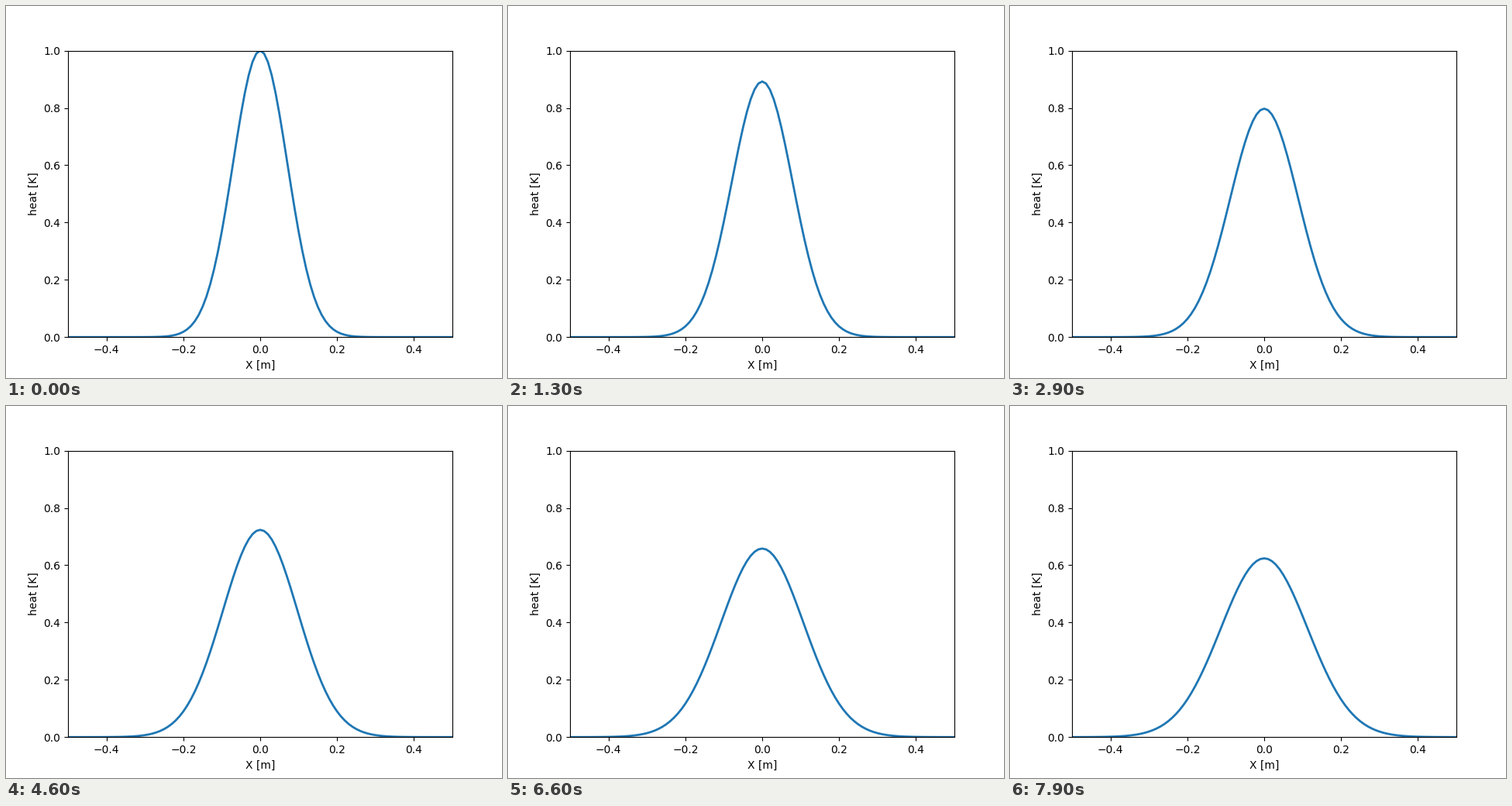
Recreate the animation shown at these times as a matplotlib script. Size 640 by 480 pixels, loop 8000 ms.

```python
import matplotlib.pyplot as plt
import numpy as np
from matplotlib.animation import FuncAnimation

FRAMES = 80
INTERVAL = 100
N = 101
R = 0.5  # diffusivity * dt / dx**2

x = np.linspace(-0.5, 0.5, N)


def implicit_matrix():
    """Backward Euler step of the heat equation with fixed ends."""
    a = (1 + 2 * R) * np.eye(N) - R * (np.eye(N, k=1) + np.eye(N, k=-1))
    a[0], a[-1] = 0, 0
    a[0, 0] = a[-1, -1] = 1
    return a


def solve():
    step = np.linalg.inv(implicit_matrix())
    states = [np.exp(-(x / 0.1) ** 2)]
    for _ in range(FRAMES - 1):
        states.append(step @ states[-1])
    return states


heat = solve()

fig, ax = plt.subplots(figsize=(6.4, 4.8), dpi=100)
ax.set(xlim=(-0.5, 0.5), ylim=(0, 1), xlabel="X [m]", ylabel="heat [K]")
line, = ax.plot(x, heat[0], lw=2)


def update(i):
    line.set_ydata(heat[i])
    return line,


anim = FuncAnimation(fig, update, frames=FRAMES, interval=INTERVAL,
                     repeat=True, repeat_delay=0)
plt.show()
```
